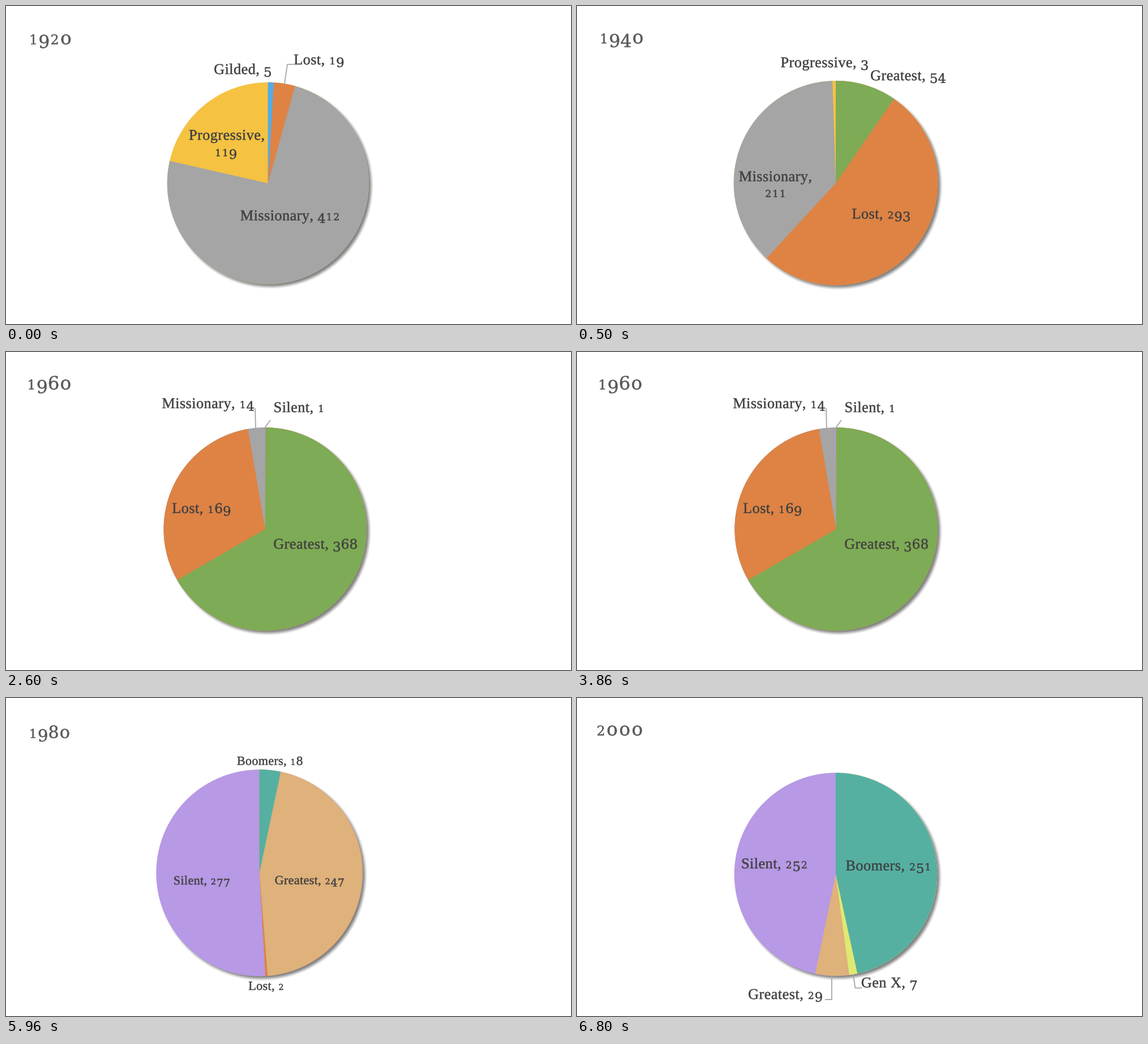
A matplotlib script for the animation above (8000 ms loop, 998 by 561 pixels).

```python
import numpy as np
import matplotlib.pyplot as plt
from matplotlib.animation import FuncAnimation
from matplotlib.patches import Circle, PathPatch, Rectangle, Wedge
from matplotlib.path import Path
from matplotlib.textpath import TextPath
from matplotlib.transforms import Affine2D

WIDTH, HEIGHT, DPI = 998, 561, 100
STEP_MS = 100
PX = 72 / DPI

COLORS = {
    "Gilded": "#4fadea", "Progressive": "#f5c242", "Missionary": "#a5a5a5",
    "Lost": "#de8344", "Greatest": "#7eab55", "Silent": "#b799e5",
    "Boomers": "#55b0a1", "Gen X": "#dfe873",
}
LATE_COLORS = COLORS | {"Greatest": "#dfb17b"}

LETTER_FONT, FIGURE_FONT = "Liberation Serif", "DejaVu Serif"
LETTER_TRACKING = 0.017
# Old-style figures: character -> (glyph, scale, drop in em, tracking in em)
FIGURES = {"0": ("o", 0.9, 0, 0.07)}
FIGURES |= {d: (d, 0.65, 0, 0.07) for d in "12"}
FIGURES |= {d: (d, 0.87, 0.18, 0) for d in "34579"}
FIGURES |= {d: (d, 0.89, 0, 0) for d in "68"}

# Labels are (text, centre x, baseline y); years add a size.
SCENES = [
    dict(ms=500, year=("1920", 79, 67.5, 34.5), pie=(462.8, 312.8, 178.1), size=25,
         slices={"Gilded": 5, "Lost": 19, "Missionary": 412, "Progressive": 119},
         labels=[("Gilded, 5", 418, 120), ("Lost, 19", 552.5, 103),
                 ("Progressive,", 389.5, 236), ("119", 389, 265),
                 ("Missionary, 412", 501, 378)],
         leaders=[[(507, 103), (497, 103), (492, 137)]]),
    dict(ms=2100, year=("1940", 79.5, 66, 34.5), pie=(457.2, 312.3, 180.4), size=25,
         slices={"Greatest": 54, "Lost": 293, "Missionary": 211, "Progressive": 3},
         labels=[("Progressive, 3", 437, 108), ("Greatest, 54", 585, 131),
                 ("Missionary,", 350, 309), ("211", 350, 337),
                 ("Lost, 293", 537, 375)],
         leaders=[], specks=True),
    dict(ms=2100, year=("1960", 77, 66, 34.5), pie=(457.8, 312.5, 179.3), size=25,
         slices={"Greatest": 368, "Lost": 169, "Missionary": 14, "Silent": 1},
         labels=[("Missionary, 14", 357, 99), ("Silent, 1", 517, 106),
                 ("Lost, 169", 345, 284), ("Greatest, 368", 546.5, 347)],
         leaders=[[(440, 100), (441, 134)], [(466.5, 121), (457.5, 133)]]),
    dict(ms=2100, year=("1980", 77.5, 70.5, 32), pie=(447.6, 308.6, 182.3), size=21,
         slices={"Boomers": 18, "Greatest": 247, "Lost": 2, "Silent": 277},
         labels=[("Boomers, 18", 466, 118), ("Silent, 277", 346, 329),
                 ("Greatest, 247", 536, 328.5), ("Lost, 2", 459, 515)],
         leaders=[], colors=LATE_COLORS),
    dict(ms=1200, year=("2000", 75.5, 66, 34.5), pie=(457, 311.1, 179.2), size=25,
         slices={"Boomers": 251, "Gen X": 7, "Greatest": 29, "Silent": 252},
         labels=[("Silent, 252", 348.5, 300.5), ("Boomers, 251", 549, 304),
                 ("Gen X, 7", 551.5, 510.5), ("Greatest, 29", 368, 531)],
         leaders=[[(439, 532), (450, 532), (450, 491)],
                  [(502, 511.5), (491.5, 511.5), (488, 489)]],
         colors=LATE_COLORS),
]

fig = plt.figure(figsize=(WIDTH / DPI, HEIGHT / DPI), dpi=DPI, facecolor="white")
ax = fig.add_axes([0, 0, 1, 1])
ax.set(xlim=(0, WIDTH), ylim=(HEIGHT, 0))
ax.axis("off")


def glyph_path(text, font):
    return TextPath((0, 0), text, size=100, prop={"family": font})


def advance(char, font):
    both, bar = glyph_path(char + "|", font), glyph_path("|", font)
    return both.get_extents().x1 - bar.get_extents().x1


def draw_text(text, center, baseline, size, color):
    glyphs, x = [], 0
    for char in text:
        font = FIGURE_FONT if char in FIGURES else LETTER_FONT
        glyph, scale, drop, tracking = FIGURES.get(char, (char, 1, 0, LETTER_TRACKING))
        if char != " ":
            place = Affine2D().scale(scale).translate(x + 50 * tracking, -100 * drop)
            glyphs.append(place.transform_path(glyph_path(glyph, font)))
        x += advance(glyph, font) * scale + 100 * tracking
    path = Path.make_compound_path(*glyphs)
    box = path.get_extents()
    zoom = 1.05 * size / 100
    place = (Affine2D().translate(-(box.x0 + box.x1) / 2, 0)
             .scale(zoom, -zoom).translate(center, baseline))
    patch = PathPatch(place.transform_path(path), facecolor=color,
                      edgecolor=color, lw=0.5 * PX, zorder=4)
    return ax.add_patch(patch)


def draw_shadow(cx, cy, radius, offset=4.2, blur=5, opacity=0.5):
    y, x = np.mgrid[0.5:HEIGHT, 0.5:WIDTH]
    distance = np.hypot(x - cx - offset, y - cy - offset) - radius
    t = np.clip((blur - distance) / (2 * blur), 0, 1)
    rgba = np.zeros((HEIGHT, WIDTH, 4))
    rgba[..., 3] = opacity * t * t * (3 - 2 * t)
    return ax.imshow(rgba, extent=(0, WIDTH, HEIGHT, 0), aspect="auto",
                     interpolation="nearest", zorder=1)


def draw_pie(cx, cy, radius, slices, colors):
    """Overlap the wedges, last one first, so that no seams show."""
    names = list(slices)
    ends = np.cumsum(list(slices.values()))
    ends = 360 * ends / ends[-1]
    parts = [Circle((cx, cy), radius, color=colors[names[-1]], lw=0, zorder=2)]
    for name, end in list(zip(names, ends))[-2::-1]:
        parts.append(Wedge((cx, cy), radius, -90, end - 90,
                           color=colors[name], lw=0, zorder=2))
    return [ax.add_patch(part) for part in parts]


def build(scene):
    artists = [draw_shadow(*scene["pie"])]
    artists += draw_pie(*scene["pie"], scene["slices"], scene.get("colors", COLORS))
    for points in scene["leaders"]:
        artists += ax.plot(*zip(*points), color="#a6a6a6", lw=1.8 * PX,
                           solid_joinstyle="miter", zorder=3)
    artists.append(draw_text(*scene["year"], "#595959"))
    artists += [draw_text(*label, scene["size"], "#404040") for label in scene["labels"]]
    if scene.get("specks"):
        artists += [ax.add_patch(Rectangle((60.5 + 159.8 * i, 16), 1, 1,
                                           color="#e4e4e4", lw=0))
                    for i in range(6)]
    return artists


stages = [build(scene) for scene in SCENES]
cuts = np.cumsum([scene["ms"] for scene in SCENES])


def update(frame):
    current = np.searchsorted(cuts, frame * STEP_MS, side="right")
    for index, artists in enumerate(stages):
        for artist in artists:
            artist.set_visible(index == current)
    return []


animation = FuncAnimation(fig, update, frames=int(cuts[-1]) // STEP_MS,
                          interval=STEP_MS, repeat=True, repeat_delay=0)
plt.show()
```
